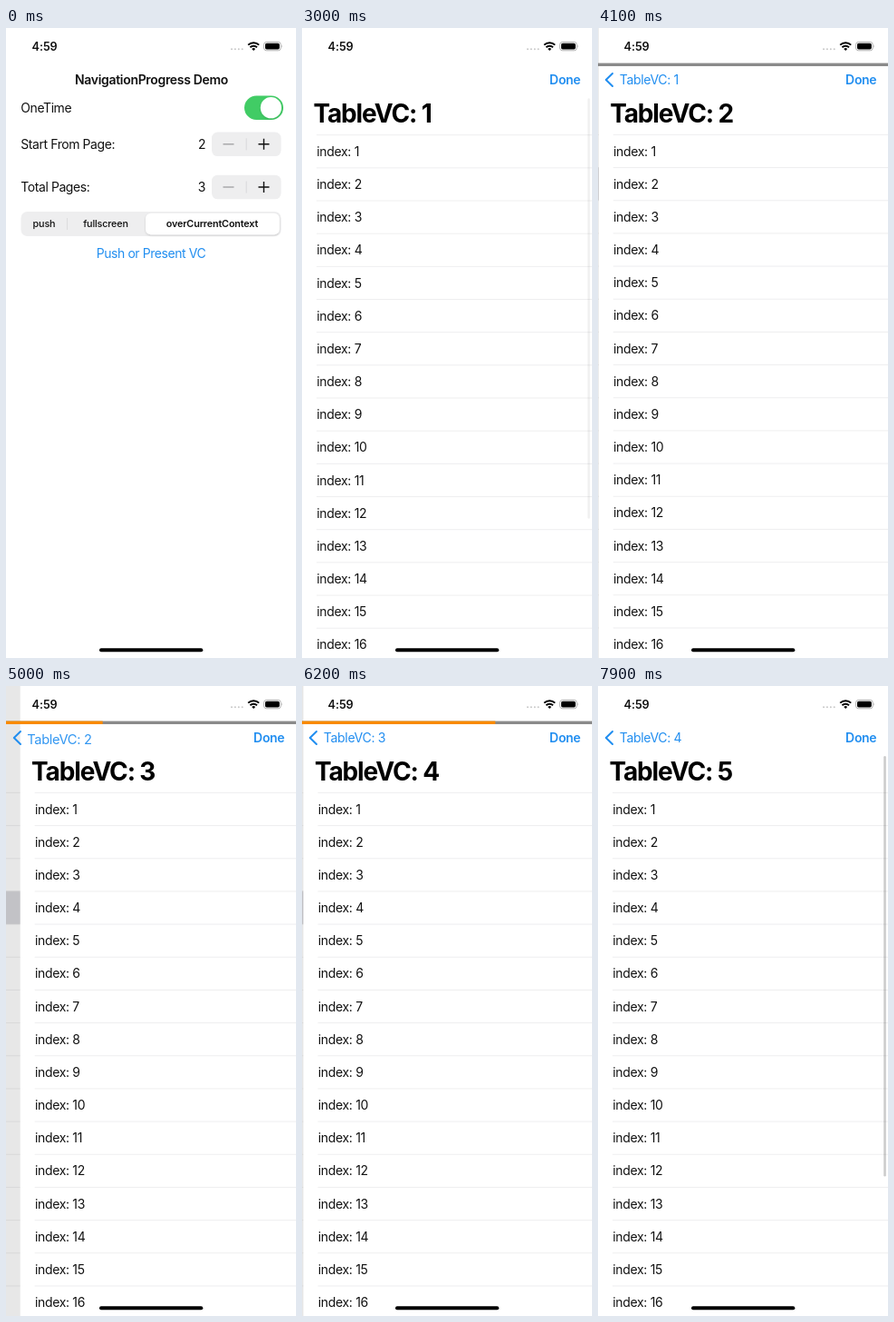
Recreate the animation shown at these times as an HTML page. Size 320x693 px, loop 8000 ms.

```html
<!DOCTYPE html>
<html lang="en">
<head>
<meta charset="utf-8">
<title>NavigationProgress Demo</title>
<style>
  html, body { margin: 0; width: 100%; height: 100%; overflow: hidden; background: #fff; }
  svg { display: block; width: 320px; height: 693px; }
  text { font: 14px Inter, sans-serif; font-optical-sizing: none; letter-spacing: -.32px; fill: #111; white-space: pre; }
  .label { letter-spacing: -.43px; }
  .semi { font-weight: 600; }
  .mid { text-anchor: middle; }
  .blue { fill: #218ef0; }
  .large { font-size: 28px; font-weight: 700; letter-spacing: -1.15px; fill: #000; }
  .segment { font-size: 10.8px; font-weight: 500; letter-spacing: -.15px; }
  .chosen { font-weight: 600; }
  .clock { font-size: 12.7px; letter-spacing: -.1px; }
  .line { stroke: #e2e2e4; stroke-width: .6; }
</style>
</head>
<body>
<svg viewBox="0 0 320 693">
  <defs>
    <linearGradient id="glow">
      <stop offset=".7" stop-color="#666"/>
      <stop offset="1" stop-color="#aaa"/>
    </linearGradient>
    <filter id="soft" x="-30%" y="-30%" width="160%" height="170%">
      <feDropShadow dx="0" dy="1" stdDeviation="1.2" flood-opacity=".16"/>
    </filter>
  </defs>

  <g id="settings">
    <text class="semi mid" x="160.5" y="62">NavigationProgress Demo</text>
    <text class="label" x="16.3" y="93">OneTime</text>
    <rect id="track" x="263" y="74.5" width="43" height="26.5" rx="13.25"/>
    <circle id="knob" cy="87.7" r="11.6" fill="#fff" filter="url(#soft)"/>
    <rect x="16.5" y="202" width="287" height="27" rx="7" fill="#eeeeef"/>
    <path d="M67.5 209v13" stroke="#d8d8da" stroke-width=".8"/>
    <rect x="154" y="203.8" width="147.8" height="23.4" rx="6" fill="#fff" filter="url(#soft)"/>
    <text class="segment mid" x="42" y="219">push</text>
    <text class="segment mid" x="110" y="219">fullscreen</text>
    <text class="segment chosen mid" x="227.5" y="219">overCurrentContext</text>
    <text class="label blue mid" x="160" y="253">Push or Present VC</text>
  </g>

  <g id="modal">
    <rect width="320" height="693" fill="#fff"/>
    <g id="pages"></g>
    <g id="titles"></g>
    <path id="chevron" d="M16 50l-7.2 7 7.2 7" fill="none" stroke="#218ef0" stroke-width="2" stroke-linecap="round" stroke-linejoin="round"/>
    <text class="semi blue" x="307.3" y="62" text-anchor="end">Done</text>
    <g id="bar">
      <rect y="38.6" width="320" height="3.4" fill="#8a8a8a"/>
      <rect id="fill" y="38.6" height="3.4" fill="#f98a00"/>
    </g>
  </g>

  <text class="semi clock" x="28.6" y="25">4:59</text>
  <path d="M249 23.3h13" stroke="#c8c8c8" stroke-width="2" stroke-linecap="round" stroke-dasharray="0 3.9"/>
  <g fill="none" stroke="#000" stroke-width="2">
    <path d="M267.2 18.6a8.6 8.6 0 0 1 12 0M269.4 21.2a5.4 5.4 0 0 1 7.6 0"/>
    <path d="M273.2 25l-2-2a2.9 2.9 0 0 1 4 0z" fill="#000" stroke="none"/>
  </g>
  <rect x="284.6" y="15.4" width="18.6" height="9.4" rx="2.8" fill="none" stroke="#aaa" stroke-width=".9"/>
  <rect x="286" y="16.8" width="15.8" height="6.6" rx="1.6"/>
  <path d="M304.2 18.6q1.3 1.5 0 3z" fill="#aaa"/>
  <rect id="home" x="103" y="682.3" width="114.3" height="4" rx="2"/>
</svg>

<script>
const LOOP = 8000, WIDTH = 320, HEIGHT = 693, ROW = 36.17, TOP = 117.4;
const opens = [2440, 3650, 4740, 5790, 7190];   // when each table starts to enter
const taps = [3490, 4730, 5780, 6990];          // when a row is selected in it
const tappedRows = [2, 4, 4, 4];

const $ = id => document.getElementById(id);
const clamp = v => Math.min(1, Math.max(0, v));
const mix = (a, b, p) => a + (b - a) * p;
const easeOut = p => 1 - (1 - clamp(p)) ** 2;

// Critically damped spring: 0 before the start, settling at 1
function spring(ms) {
  const u = Math.max(0, ms) * .01826;
  return 1 - (1 + u) * Math.exp(-u);
}

const stepper = (label, value, y) => `
  <text class="label" x="16.3" y="${y + 5}">${label}</text>
  <text class="mid" x="216" y="${y + 5}">${value}</text>
  <rect x="227" y="${y - 13.3}" width="76.5" height="26.6" rx="6.5" fill="#eeeeef"/>
  <path d="M239.5 ${y}h12" stroke="#a4a4a6" stroke-width="1.4"/>
  <path d="M265.2 ${y - 6.5}v13" stroke="#d4d4d6" stroke-width=".8"/>
  <path d="M278.5 ${y}h12m-6-6v12" stroke="#111" stroke-width="1.4"/>`;

function table(k) {
  let rows = '';
  for (let i = 0; i < 16; i++) {
    const y = TOP + ROW * i;
    rows += `<path class="line" d="M16 ${y}H320"/><text x="16.2" y="${y + 23.2}">index: ${i + 1}</text>`;
  }
  const selected = TOP + ROW * (tappedRows[k] - 1);
  return `<g id="page${k}">
    <rect width="320" height="693" fill="#fff"/>
    ${k < 4 ? `<rect id="mark${k}" y="${selected - .4}" width="320" height="${ROW + .4}" fill="#d6d6da"/>` : ''}
    ${rows}
    <rect id="scroll${k}" x="315.2" y="77" width="2.6" height="462.5" rx="1.3" fill="#000"/>
    <rect id="dim${k}" width="320" height="693"/>
  </g>`;
}

const heading = k => `
  <text class="large" id="title${k}">TableVC: ${k + 1}</text>
  ${k ? `<text class="blue" id="back${k}">TableVC: ${k}</text>` : ''}`;

$('settings').insertAdjacentHTML('beforeend',
  stepper('Start From Page:', 2, 127.8) + stepper('Total Pages:', 3, 175));
$('pages').innerHTML = opens.map((_, k) => table(k)).join('');
$('titles').innerHTML = opens.map((_, k) => heading(k)).join('');

function place(el, x, y, scale = 1, opacity = 1) {
  el.setAttribute('transform', `translate(${x} ${y}) scale(${scale})`);
  el.setAttribute('opacity', clamp(opacity));
}

function drawPage(k, t) {
  const enter = k ? spring(t - opens[k]) : 1;
  const leave = k < 4 ? spring(t - opens[k + 1]) : 0;
  const right = WIDTH * (1 - enter);
  place($('page' + k), right - 96 * leave, 0);
  $('dim' + k).setAttribute('opacity', .1 * leave);
  $('scroll' + k).setAttribute('opacity', .38 * clamp((t - opens[k] - 500) / 400));
  if (k < 4) $('mark' + k).setAttribute('opacity', t >= taps[k] ? 1 : 0);

  // The large title shrinks into the next table's back label
  place($('title' + k), right + mix(12.4, 23.8, leave), mix(104, 62, leave),
    mix(1, .5, leave), 1 - 1.6 * leave);
  if (k) place($('back' + k), mix(12.4, 23.8, enter) - 96 * leave, mix(104, 62, enter),
    mix(2, 1, enter), Math.min(enter * 1.6 - .6, 1 - 1.6 * leave));
}

function draw(t) {
  const off = easeOut((t - 980) / 320);
  $('track').setAttribute('fill',
    `rgb(${mix(65, 233, off)},${mix(204, 233, off)},${mix(101, 235, off)})`);
  $('knob').setAttribute('cx', mix(292.4, 276.6, off));

  place($('modal'), 0, HEIGHT * (1 - spring(t - opens[0])));
  opens.forEach((_, k) => drawPage(k, t));
  $('chevron').setAttribute('opacity', spring(t - opens[1]));

  $('bar').setAttribute('visibility', t >= opens[1] && t < opens[4] ? 'visible' : 'hidden');
  const progress = opens.slice(1, 4).reduce((sum, start) => sum + easeOut((t - start - 600) / 270), 0);
  $('fill').setAttribute('width', WIDTH * progress / 3);

  $('home').setAttribute('fill', t > 5500 && t < 6000 ? 'url(#glow)' : '#000');
}

function tick() {
  draw(performance.now() % LOOP);
  requestAnimationFrame(tick);
}
tick();
</script>
</body>
</html>
```
